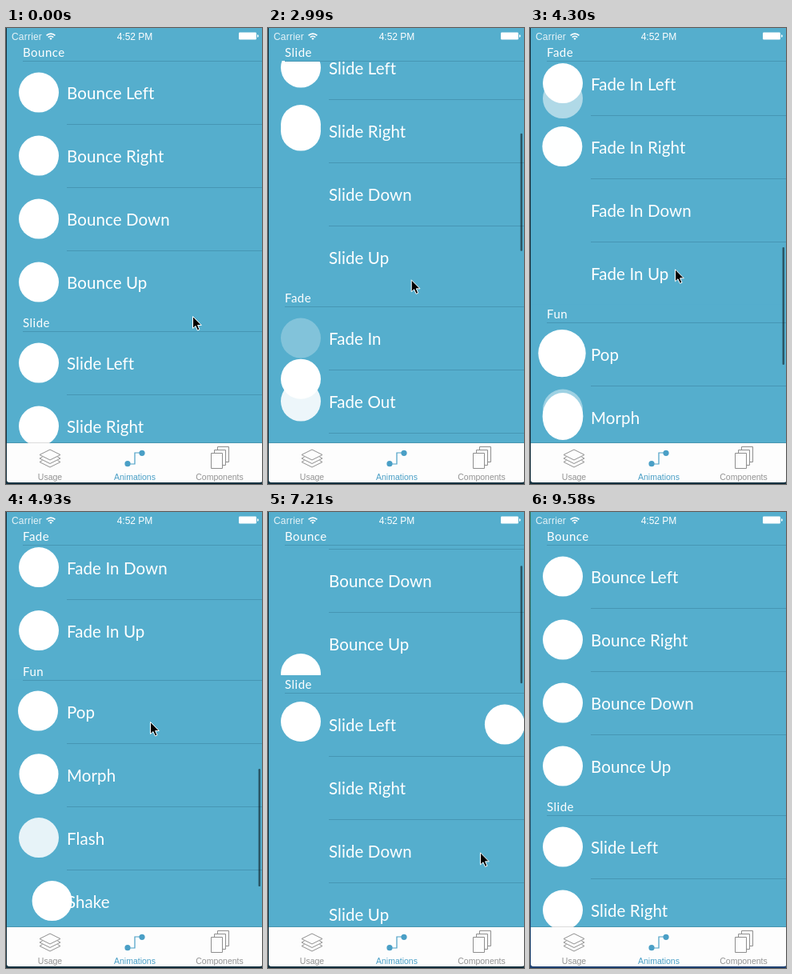
Recreate the animation shown at these times as an HTML page. Size 320 px wide and 570 px high, loop 9930 ms.

```html
<!DOCTYPE html>
<html lang="en">
<head>
<meta charset="utf-8">
<title>Animation list</title>
<style>
html, body { margin: 0; width: 100%; height: 100%; overflow: hidden; background: #55aecd; }
svg { display: block; width: 100%; height: 100%; }
.row { font: 400 20.5px Lato, "Open Sans", sans-serif; letter-spacing: .1px; fill: #fff; }
.head { font: 400 15px Lato, "Open Sans", sans-serif; letter-spacing: .5px; fill: #fff; }
.line { fill: #4696b4; height: 1px; shape-rendering: crispEdges; }
.bar { font: 12px "Liberation Sans", Arial, sans-serif; fill: #fff; }
.tab { font: 10.5px "Liberation Sans", Arial, sans-serif; fill: #929292; text-anchor: middle; }
.icon { fill: none; stroke: #8e8e8e; stroke-width: 1; }
</style>
</head>
<body>
<svg viewBox="0 0 320 570">
  <defs>
    <clipPath id="view"><rect y="20" width="320" height="499"/></clipPath>
    <linearGradient id="dusk" x2="0" y2="1">
      <stop offset="0" stop-color="#2f7a60"/><stop offset="1" stop-color="#1c3f70"/>
    </linearGradient>
  </defs>
  <rect width="320" height="570" fill="#55aecd"/>
  <g clip-path="url(#view)">
    <g id="rows"></g>
    <g id="heads"></g>
    <rect id="thumb" x="315.5" width="2.5" rx="1.2" fill="#000"/>
  </g>

  <rect width="320" height="20" fill="#55aecd"/>
  <text class="bar" x="7" y="14.5" letter-spacing=".2" opacity=".85">Carrier</text>
  <path d="M50.6 9.3a7.600 7.600 0 0 1 10.800 0M52.800 11.600a4.500 4.500 0 0 1 6.400 0" fill="none" stroke="#fff" stroke-width="1.7"/>
  <path d="M54.300 13l1.700 1.900 1.700-1.900a2.600 2.600 0 0 0-3.400 0z" fill="#fff"/>
  <text class="bar" x="161" y="14.5" text-anchor="middle" font-weight="700">4:52 PM</text>
  <rect x="291" y="5.5" width="22" height="9" rx="1.2" fill="#fff"/>
  <path d="M314 8.200q1.800 .3 1.800 1.800t-1.800 1.800z" fill="#fff"/>

  <rect y="518" width="320" height="1" fill="#000" opacity=".14"/>
  <rect y="519" width="320" height="51" fill="#fdfdfd"/>
  <g class="icon">
    <path d="M55 527l13 6.500-13 6.500-13-6.500z"/>
    <path id="layer" d="M45.500 536.200L42 538l13 6.500 13-6.500-3.500-1.800"/>
    <use href="#layer" y="4.5"/>
    <path d="M256.500 531.500h14v19h-14zM260.500 531v-3.500h14v19h-3.500M264.500 527v-3.500h14v19h-3.500"/>
  </g>
  <path d="M152 545h9v-14h9" fill="none" stroke="#4a9fc6" stroke-width="1.2"/>
  <circle cx="152" cy="544.7" r="3.6" fill="#4a9fc6"/>
  <circle cx="170" cy="531.3" r="3.6" fill="#4a9fc6"/>
  <text class="tab" x="55" y="565">Usage</text>
  <text class="tab" x="161" y="565" style="fill:#4a9fc6">Animations</text>
  <text class="tab" x="267" y="565">Components</text>
  <path id="edge" d="M0 0h1v565q0 3 3 3h313q4 0 4-3v5H0z"/>
  <path id="cursor" d="M.5 .5v15l3.500-3 2.400 5.500 2.600-1-2.400-5.500h4.700z" fill="#000" stroke="#fff" stroke-linejoin="round"/>
</svg>
<script>
const LOOP = 9930, ROW = 79, HEAD = 22, TOP = 41, BOTTOM = 518, END = 1169;
const $ = id => document.getElementById(id);
const set = (el, attrs) => { for (const k in attrs) el.setAttribute(k, attrs[k]); };
const make = (parent, tag, attrs = {}, text = "") => {
  const el = document.createElementNS("http://www.w3.org/2000/svg", tag);
  set(el, attrs);
  el.textContent = text;
  return parent.appendChild(el);
};
const clamp = (v, lo = 0, hi = 1) => Math.max(lo, Math.min(hi, v));
const mix = (a, b, p) => a + (b - a) * p;
const ease = p => p ** 1.75 / (p ** 1.75 + (1 - p) ** 1.75);

// Eased steps through equally spaced values
const seq = (p, ...v) => {
  const n = v.length - 1, i = Math.min(n - 1, Math.floor(p * n));
  return mix(v[i], v[i + 1], ease(p * n - i));
};

// Each swipe drags the list evenly, then lets it coast to rest
const swipes = [
  { at: 2330, dur: 230, drag: 140, coast: 347, tau: 400 },
  { at: 3740, dur: 160, drag: 200, coast: 170, tau: 125 },
  { at: 4703, dur: 227, drag: 145.5, coast: 166.5, tau: 90 },
  { at: 6750, dur: 110, drag: -600, coast: -130, tau: 30 },
  { at: 6925, dur: 400, drag: -400, coast: -73, tau: 100 },
  { at: 7790, dur: 1, drag: 0, coast: 34, tau: 120 }
];
const scrollAt = t => swipes.reduce((sum, { at, dur, drag, coast, tau }) =>
  sum + drag * clamp((t - at) / dur)
    + coast * (1 - Math.exp(-Math.max(0, t - at - dur) / tau)), 0);

// Pointer stops: time, x, y
const stops = [
  [300, 233, 360], [600, 165, 86], [1000, 155, 163], [1260, 155, 163],
  [1760, 154, 241], [1900, 154, 242], [2330, 178, 394], [2560, 180, 254],
  [3500, 177, 395], [3740, 177, 395], [3900, 181, 196], [4703, 181, 407],
  [4930, 180, 262], [5300, 190, 230], [5750, 332, 210], [6740, 332, 150],
  [6925, 270, 92], [7325, 264, 492], [7770, 266, 526], [8200, 290, 580]
];
function pointerAt(t) {
  const i = stops.findIndex(s => s[0] > t);
  const b = stops.at(i), a = i > 0 ? stops[i - 1] : b;
  const p = a === b ? 0 : ease((t - a[0]) / (b[0] - a[0]));
  return [mix(a[1], b[1], p), mix(a[2], b[2], p)];
}

// Moves map progress to offset (x, y), scale (sx, sy) and opacity (a)
const slide = (axis, from) => p => ({ [axis]: seq(p, from, 0) });
const bounce = (axis, from, k) => p => ({ [axis]: seq(p, from, -10 * k, 5 * k, -2 * k, 0) });
const fade = (axis, from) => p => ({ [axis]: seq(p, from, 0), a: ease(p) });
const zoom = (from, to) => p => {
  const s = seq(p, from, to);
  return { sx: s, sy: s, a: 2 - s };
};
const list = {
  Bounce: {
    "Bounce Left": bounce("x", 320, 1),
    "Bounce Right": bounce("x", -320, -1),
    "Bounce Down": bounce("y", -570, -1),
    "Bounce Up": bounce("y", 570, -1)
  },
  Slide: {
    "Slide Left": slide("x", 300),
    "Slide Right": slide("x", -300),
    "Slide Down": slide("y", -300),
    "Slide Up": slide("y", 300)
  },
  Fade: {
    "Fade In": fade("x", 0),
    "Fade Out": p => ({ a: 1 - ease(p) }),
    "Fade In Left": fade("x", 300),
    "Fade In Right": fade("x", -300),
    "Fade In Down": fade("y", -300),
    "Fade In Up": fade("y", 300)
  },
  Fun: {
    "Pop": p => { const s = seq(p, 1, 1.2, .9, 1); return { x: -1, y: -.5, sx: s, sy: s }; },
    "Morph": p => ({ y: -.5, sx: seq(p, 1, 1, 1.2, .9, 1), sy: seq(p, 1, 1.2, .9, 1.1, 1) }),
    "Flash": p => ({ a: seq(p, 0, 1, 0, 1) }),
    "Shake": p => ({ x: seq(p, 0, 30, -30, 15, -15, 0) }),
    "Zoom In": zoom(1, 2),
    "Zoom Out": zoom(2, 1)
  }
};
const taps = { "Bounce Left": 570, "Bounce Right": 1260, "Bounce Down": 1850 };

// A row starts to move when tapped and whenever it scrolls into view
function startTimes(name, top) {
  const times = name in taps ? [taps[name]] : [];
  const seen = t => top - scrollAt(t) < BOTTOM && top + ROW - scrollAt(t) > 19;
  for (let t = 5; t < LOOP; t += 5)
    if (seen(t) && !seen(t - 5)) times.push(t);
  return times;
}

const rows = [], heads = [];
let y = TOP;
for (const title in list) {
  const g = make($("heads"), "g");
  make(g, "rect", { y: -HEAD, width: 320, height: HEAD, fill: "#55aecd" });
  make(g, "rect", { class: "line", x: 21, width: 299, height: 1 });
  make(g, "text", { class: "head", x: 21, y: -5 }, title);
  heads.push({ g, y });
  const names = Object.keys(list[title]);
  names.forEach((name, i) => {
    const el = make($("rows"), "g");
    make(el, "text", { class: "row", x: 76, y: 48 }, name);
    if (i < names.length - 1)
      make(el, "rect", { class: "line", x: 76, y: ROW, width: 244, height: 1 });
    const dot = make(el, "circle", { r: 25, fill: "#fff" });
    rows.push({ el, dot, y, move: list[title][name], starts: startTimes(name, y) });
    y += ROW;
  });
  y += HEAD;
}

function draw(t) {
  const s = Math.round(scrollAt(t) * 2) / 2;
  for (const r of rows) {
    const start = r.starts.filter(v => v <= t).pop() ?? -LOOP;
    const { x = 0, y = 0, sx = 1, sy = 1, a = 1 } = r.move(clamp((t - start) / 1000));
    set(r.el, { transform: `translate(0 ${r.y - s})` });
    set(r.dot, {
      transform: `translate(${41 + x} ${39.6 + y}) scale(${sx} ${sy})`,
      opacity: a
    });
  }
  heads.forEach((h, i) => {
    const next = heads[i + 1];
    let pos = Math.max(TOP, h.y - s);
    if (next) pos = Math.min(pos, Math.max(next.y - s, TOP) - HEAD);
    set(h.g, { transform: `translate(0 ${pos})` });
  });

  const shown = (from, to) => clamp((t - from) / 80) * clamp((to - t) / 250);
  set($("thumb"), {
    y: 21.5 + clamp(s / END) * 349,
    height: 147 + Math.min(0, s),
    opacity: .5 * (shown(2330, 5900) + shown(6750, 8440))
  });
  set($("cursor"), { transform: `translate(${pointerAt(t)})` });
  set($("edge"), { fill: t >= 9580 ? "url(#dusk)" : "#14303e" });
}

const begin = performance.now();
function tick() {
  draw((performance.now() - begin) % LOOP);
  requestAnimationFrame(tick);
}
tick();
</script>
</body>
</html>
```
